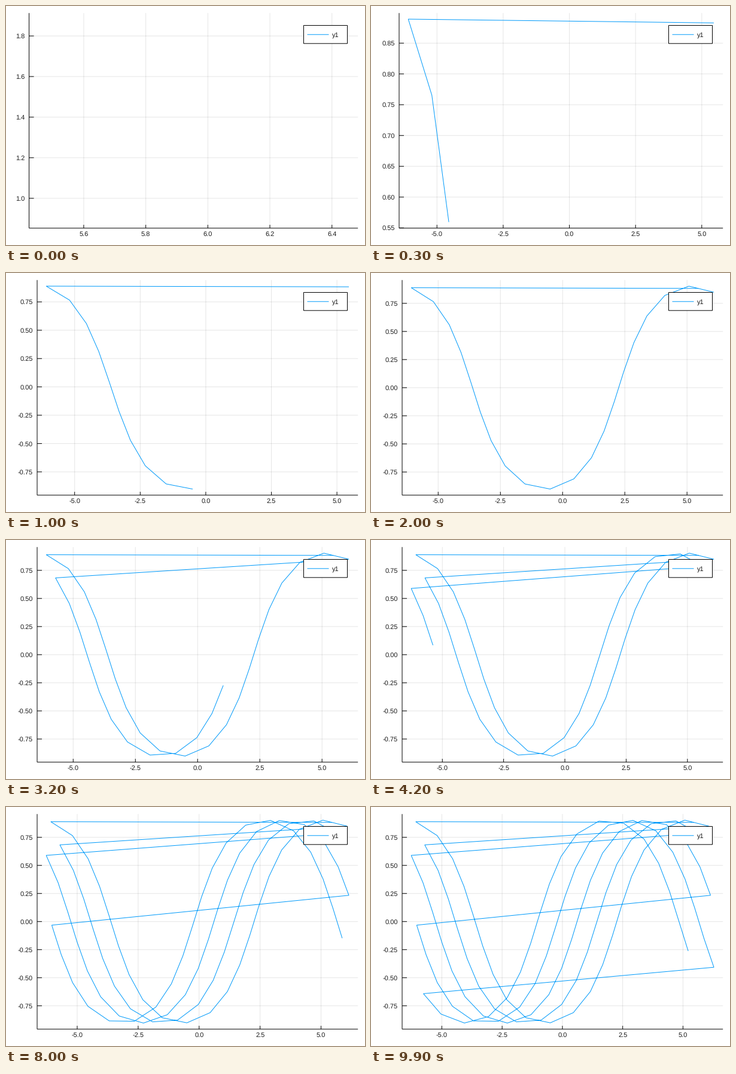
These frames come from a looping animation (600x400 px, 10 s). A matplotlib script:

```python
import numpy as np
import matplotlib.pyplot as plt
from matplotlib.animation import FuncAnimation
from matplotlib.patches import Rectangle

W, H, DPI = 600, 400, 100
PX = 72 / DPI                       # points per pixel
TOP, RIGHT, BOTTOM = 11.8, 588.2, 371.8
BLUE = "#009afa"
FRAMES = 100

# Ground track of a satellite in a circular orbit, one point every 5 minutes
TILT = np.radians(51.6)
STEP, PHASE = 0.33844, -0.184       # radians along the orbit from the northern apex
SPIN = 0.02216                      # planet rotation per point

n = np.arange(FRAMES)
arc = STEP * n + PHASE
lat = np.arcsin(np.sin(TILT) * np.cos(arc))
lat = np.arctan(1.00674 * np.tan(lat))          # geodetic latitude
lon = np.arctan2(np.sin(arc), np.cos(TILT) * np.cos(arc)) - SPIN * n
xs = (6.036 + 2 * lon + 2 * np.pi) % (4 * np.pi) - 2 * np.pi
ys = lat

# Tick spacing while the ranges are still growing
Y_STEPS = {0: 0.2, 1: 0.001, 2: 0.02, 3: 0.05, 4: 0.1, 5: 0.2, 7: 0.2}

plt.rcParams["text.hinting"] = "no_hinting"
fig = plt.figure(figsize=(W / DPI, H / DPI), dpi=DPI, facecolor="white")
ax = fig.add_axes([0, 0, 1, 1])


def limits(v):
    lo, hi = v.min(), v.max()
    if lo == hi:
        hi = lo + 1
    pad = 0.03 * (hi - lo)
    return lo - pad, hi + pad


def ticks(lo, hi, step):
    first = int(np.ceil(lo / step - 0.01))
    last = int(np.floor(hi / step + 0.01))
    places = next(d for d in range(1, 5) if abs(step * 10**d - round(step * 10**d)) < 1e-9)
    return [(k * step, f"{k * step:.{places}f}") for k in range(first, last + 1)]


def text_width(s):
    em = {".": 0.278, "-": 0.333}
    return 10.67 * sum(em.get(c, 0.556) for c in s)


def line(x, y, color="black", **kw):
    ax.plot(x, y, color=color, lw=PX, snap=False, solid_capstyle="butt", **kw)


def label(x, y, s, ha):
    ax.text(x, y, s, ha=ha, va="baseline", family="Liberation Sans",
            size=11 * PX, color="#1a1a1a", zorder=6)


def draw_legend():
    ax.add_patch(Rectangle((497.5, 32.5), 73, 30.3, fc="white", ec="black",
                           lw=PX, zorder=4, snap=False))
    line([503.5, 539.5], [47.8, 47.8], BLUE, zorder=5)
    label(545, 51.8, "y1", "left")


def draw(i):
    ax.clear()
    ax.set_xlim(0, W)
    ax.set_ylim(H, 0)
    ax.axis("off")

    x, y = xs[:i + 1], ys[:i + 1]
    x0, x1 = limits(x)
    y0, y1 = limits(y)
    xticks = ticks(x0, x1, 0.2 if i == 0 else 2.5)
    yticks = ticks(y0, y1, Y_STEPS.get(i, 0.25))
    left = 17.5 + 1.42 * max(text_width(s) for _, s in yticks)

    def px(v):
        return left + (v - x0) / (x1 - x0) * (RIGHT - left)

    def py(v):
        return BOTTOM - (v - y0) / (y1 - y0) * (BOTTOM - TOP)

    for v, s in xticks:
        p = px(v)
        line([p, p], [TOP, BOTTOM], alpha=0.1, zorder=1)
        line([p, p], [BOTTOM, BOTTOM - 5.5], zorder=2)
        label(p, 385, s, "center")
    for v, s in yticks:
        p = py(v)
        line([left, RIGHT], [p, p], alpha=0.1, zorder=1)
        line([left, left + 8], [p, p], zorder=2)
        label(left - 7, p + 4, s, "right")

    line([left, left], [TOP, BOTTOM], zorder=2)
    line([left, RIGHT], [BOTTOM, BOTTOM], zorder=2)
    line(px(x), py(y), BLUE, zorder=3, solid_joinstyle="miter")
    draw_legend()
    return []


anim = FuncAnimation(fig, draw, frames=FRAMES, interval=100, repeat=True)
plt.show()
```
